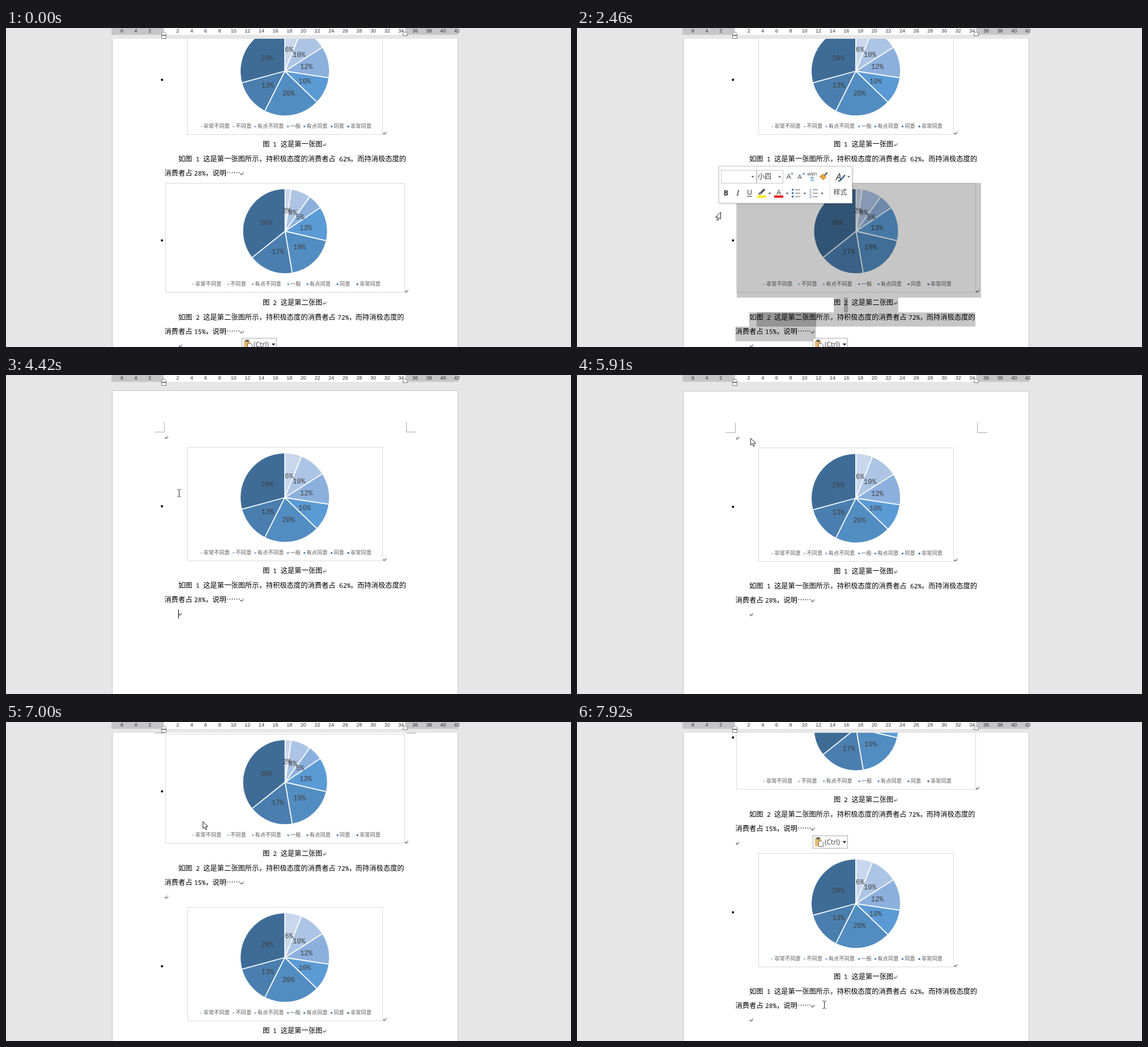
Recreate the animation shown at these times as an HTML page with a canvas. Size 997 by 562 pixels, loop 8000 ms.

```html
<!DOCTYPE html>
<html lang="zh-CN">
<head>
<meta charset="utf-8">
<style>
html, body { margin: 0; width: 100%; height: 100%; overflow: hidden; background: #e6e6e6; }
canvas { display: block; width: 997px; height: 562px; }
</style>
</head>
<body>
<canvas id="stage" width="997" height="562"></canvas>
<script>
const ctx = document.getElementById('stage').getContext('2d');
const LOOP = 8000, STEP = 78, PHASE = 36;
const CJK = '"Noto Sans CJK SC", "Noto Sans CJK JP", "Noto Sans CJK", sans-serif';
const MONO = '"Noto Sans Mono", monospace';
const TYPEWRITER = '"Liberation Mono", monospace';
const SANS = '"Liberation Sans", sans-serif';
const UI = '"Open Sans", sans-serif';
const BLUES = ['#c8d7ed', '#adc5e5', '#8cb0dd', '#5b9bd5', '#528dc1', '#4a7eaf', '#3f6c96'];
const ANSWERS = ['非常不同意', '不同意', '有点不同意', '一般', '有点同意', '同意', '非常同意'];

const charts = [
  { box: [320.5, -12.5, 344, 200], cx: 492, cy: 76, r: 78, bullet: 91, legendY: 173,
    ends: [6.1, 16, 27.4, 37.2, 57.4, 70.8, 100],
    labels: [['6%', 499.5, 38], ['10%', 517, 47], ['12%', 530, 68], ['10%', 527, 94],
      ['20%', 498.5, 115], ['13%', 461.5, 101], ['29%', 461, 53]],
    legend: [343, 400, 438.5, 496, 525, 573, 602.5] },
  { box: [281.5, 273.5, 422, 192], cx: 492.5, cy: 358, r: 74, bullet: 374, legendY: 451,
    ends: [2.3, 9.9, 15.6, 28.6, 47.3, 64.3, 100],
    labels: [['2%', 495.5, 322], ['8%', 506, 324.5], ['5%', 519, 333], ['13%', 529, 352],
      ['19%', 518, 386], ['17%', 479.5, 394], ['36%', 459, 342.5]],
    legend: [328.5, 390.5, 434, 496.5, 530.5, 583.5, 618.5] }
];

const scrollKeys = [[3860, 0], [4260, 120], [4338, 134], [4404, 140], [4482, 141],
  [6580, 141], [6978, 59], [7368, -44], [7446, -40], [7524, -36]];
const pointerKeys = [[210, 738, 560], [740, 440, 534], [920, 437, 535], [1140, 428.5, 535],
  [1440, 425, 535], [1600, 380, 516], [1750, 330, 488], [2060, 256, 338],
  [2450, 256, 338], [2451, 253, 324], [3160, 253, 324], [3470, 268, 300], [3780, 315, 255],
  [4260, 306, 215], [4404, 306, 208], [4900, 290, 112], [5120, 306, 111],
  [6290, 306, 111], [6978, 347, 175], [7390, 400, 380], [7836, 437, 498]];

const within = (t, from, to) => t >= from && t < to;

function track(keys, t) {
  if (t <= keys[0][0]) return keys[0].slice(1);
  for (let i = 1; i < keys.length; i++) {
    const a = keys[i - 1], b = keys[i];
    if (t < b[0]) {
      const k = (t - a[0]) / (b[0] - a[0]);
      return a.slice(1).map((v, n) => v + (b[n + 1] - v) * k);
    }
  }
  return keys[keys.length - 1].slice(1);
}

function rect(x, y, w, h, fill) {
  ctx.fillStyle = fill;
  ctx.fillRect(x, y, w, h);
}

function frame(x, y, w, h, stroke, fill) {
  if (fill) rect(x, y, w, h, fill);
  ctx.strokeStyle = stroke;
  ctx.lineWidth = 1;
  ctx.strokeRect(x, y, w, h);
}

function text(s, x, y, font, color = '#000', align = 'left') {
  ctx.font = font;
  ctx.fillStyle = color;
  ctx.textAlign = align;
  ctx.fillText(s, x, y);
}

function line(points, color, width = 1) {
  ctx.strokeStyle = color;
  ctx.lineWidth = width;
  ctx.beginPath();
  points.forEach(p => ctx.lineTo(...p));
  ctx.stroke();
}

function shape(points, fill, stroke) {
  ctx.beginPath();
  points.forEach(p => ctx.lineTo(...p));
  ctx.closePath();
  if (fill) { ctx.fillStyle = fill; ctx.fill(); }
  if (stroke) { ctx.strokeStyle = stroke; ctx.lineWidth = 1; ctx.stroke(); }
}

// Pieces are [text, x]; plain ASCII gets the monospaced face.
function row(y, pieces) {
  for (const [s, x] of pieces) {
    text(s, x, y + 4.7, /^[\d%]+$/.test(s) ? `11.2px ${MONO}` : `12.3px ${CJK}`);
  }
}

function returnMark(x, y) {
  line([[x + 2.5, y - 3], [x + 2.5, y + 1], [x - 2, y + 1]], '#777');
  shape([[x - 3, y + 1], [x, y - 1.5], [x, y + 3.5]], '#777');
}

function chart(c) {
  frame(...c.box, '#d9d9d9', '#fff');
  rect(273.5, c.bullet - 1.5, 3.5, 3.5, '#000');
  const angle = p => p / 50 * Math.PI - Math.PI / 2;
  c.ends.forEach((end, i) => {
    ctx.beginPath();
    ctx.moveTo(c.cx, c.cy);
    ctx.arc(c.cx, c.cy, c.r, angle(i ? c.ends[i - 1] : 0), angle(end));
    ctx.fillStyle = BLUES[i];
    ctx.fill();
  });
  c.ends.forEach(end => line([[c.cx, c.cy],
    [c.cx + c.r * Math.cos(angle(end)), c.cy + c.r * Math.sin(angle(end))]], '#fff', 1.8));
  c.labels.forEach(([s, x, y]) => text(s, x, y + 4.3, `12.3px ${TYPEWRITER}`, '#404040', 'center'));
  c.legend.forEach((x, i) => {
    rect(x, c.legendY - 1, 3, 3, BLUES[i]);
    text(ANSWERS[i], x + 5.3, c.legendY + 3.4, `9.3px ${CJK}`, '#595959');
  });
}

function shifted(dy, draw) {
  ctx.save();
  ctx.translate(0, dy);
  draw();
  ctx.restore();
}

function firstSection() {
  chart(charts[0]);
  returnMark(668, 185);
  row(204.5, [['图', 453], ['1', 471], ['这是第一张图', 484.5]]);
  returnMark(562, 205.5);
  row(230, [['如图', 304], ['1', 335], ['这是第一张图所示，持积极态度的消费者占', 348],
    ['62%', 588], ['，', 607.5], ['而持消极态度的', 620]]);
  row(255.5, [['消费者占', 279.5], ['28%', 332], ['，说明……', 352]]);
  returnMark(416, 256.5);
  returnMark(307.5, 281);
}

function secondSection() {
  chart(charts[1]);
  returnMark(706.5, 463.5);
  row(483.5, [['图', 453], ['2', 471], ['这是第二张图', 484.5]]);
  returnMark(562, 484.5);
  row(509, [['如图', 304], ['2', 335], ['这是第二张图所示，持积极态度的消费者占', 348],
    ['72%', 585], ['，', 605], ['而持消极态度的', 616.5]]);
  row(534.5, [['消费者占', 279.5], ['15%', 332], ['，说明……', 352]]);
  returnMark(416, 535.5);
}

function selection(x, y) {
  const shade = 'rgba(0,0,0,.224)', field = 'rgba(0,0,0,.25)';
  if (y >= 526) return rect(x, 526, 421 - x, 26, shade);
  rect(279.5, 526, 142, 26, shade);
  if (y >= 500) {
    const left = Math.max(304, x);
    return rect(left, 501, 703 - left, 25, shade);
  }
  rect(304, 501, 399, 25, shade);
  rect(317, 501, 105, 25, field);
  rect(453, 475, 114, 26, shade);
  rect(471, 475, 7, 26, field);
  if (y < 475) rect(282, 273, 431, 202, shade);
}

function dropArrow(x, y, r = 2.5, color = '#555') {
  shape([[x - r, y - r / 2], [x + r, y - r / 2], [x, y + r / 2 + .5]], color);
}

function pasteButton(y) {
  frame(416.5, y + .5, 61, 22, '#ababab', '#fff');
  rect(420, y + 5, 11, 14, '#e8b96a');
  rect(422.5, y + 3, 6, 4, '#666');
  shape([[426.5, y + 9.5], [431.5, y + 9.5], [434.5, y + 12.5], [434.5, y + 19.5], [426.5, y + 19.5]],
    '#fff', '#666');
  text('(Ctrl)', 437, y + 15.5, `12px ${UI}`, '#444');
  dropArrow(472, y + 11.5, 3.5, '#333');
}

function brush(x, y, color) {
  line([[x + 6, y - 7], [x + 1, y - 1]], '#555', 2.5);
  shape([[x - 7, y], [x - 1, y - 4], [x + 4, y + 1], [x - 1, y + 6]], color, '#a66b20');
}

function miniToolbar() {
  ctx.save();
  ctx.shadowColor = 'rgba(0,0,0,.3)';
  ctx.shadowBlur = 4;
  ctx.shadowOffsetY = 1;
  rect(251, 244, 235, 64, '#fff');
  ctx.restore();
  frame(250.5, 243.5, 235, 65, '#c6c6c6');
  frame(254.5, 250.5, 62, 23, '#c6c6c6');
  frame(317.5, 250.5, 46, 23, '#c6c6c6');
  line([[446.5, 248], [446.5, 304]], '#e1e1e1');
  text('小四', 319, 265.5, `12px ${CJK}`, '#333');
  [[310, 262], [357.5, 262], [479.5, 262], [340, 291.5], [371, 291.5], [402, 291.5], [432.5, 291.5]]
    .forEach(p => dropArrow(...p));

  text('A', 369.5, 266, `13px ${UI}`, '#444');
  line([[377.5, 258], [379.5, 255.5], [381.5, 258]], '#2b6cb0', 1.2);
  text('A', 389.5, 266, `11.5px ${UI}`, '#444');
  line([[398, 255.5], [400, 258], [402, 255.5]], '#2b6cb0', 1.2);
  text('wén', 415, 260, `9px ${UI}`, '#444', 'center');
  text('文', 415, 269, `9px ${CJK}`, '#2b7cc4', 'center');
  brush(435.5, 261.5, '#f0a63c');
  text('A', 457, 268, `italic 17px ${UI}`, '#333');
  line([[473, 259], [465, 268], [461, 270]], '#2f5f8f', 2.5);
  text('样式', 452.5, 293.5, `12px ${CJK}`, '#444');

  text('B', 263, 294.5, `bold 12.5px ${UI}`, '#333', 'center');
  text('I', 284, 294.5, 'italic 13px "Noto Serif", serif', '#333', 'center');
  text('U', 304.5, 294, `12.5px ${UI}`, '#333', 'center');
  line([[300, 296.5], [309, 296.5]], '#333');
  line([[331, 284], [324, 291]], '#555', 3.5);
  shape([[321, 289], [326, 293], [320, 294]], '#777');
  rect(318, 295, 15, 4, '#ffe600');
  text('A', 356, 293.5, `13px ${UI}`, '#444', 'center');
  rect(348, 295, 16, 4, '#f01818');
  [285, 291, 297].forEach((y, i) => {
    rect(379, y - 1.5, 3, 3, '#2b6cb0');
    line([[385, y], [394, y]], '#555');
    text(i + 1, 410, y + 2.5, `7px ${SANS}`, '#2b6cb0');
    line([[416, y], [425, y]], '#555');
  });
}

function ruler() {
  rect(0, 0, 997, 19, '#e6e6e6');
  rect(186, 0, 612, 12, '#c6c6c6');
  rect(278.5, 0, 426, 12, '#fff');
  for (let n = -6; n <= 42; n += 2) {
    if (n) text(Math.abs(n), 278.4 + 12.32 * n, 8, `9px ${SANS}`, '#333', 'center');
  }
  shape([[278.5, 6.5], [282.5, 10], [282.5, 12.5], [274.5, 12.5], [274.5, 10]], '#fff', '#777');
  frame(274.5, 13.5, 8, 5, '#777', '#fff');
  shape([[704.5, 6.5], [708.5, 10], [708.5, 13.5], [700.5, 13.5], [700.5, 10]], '#fff', '#777');
}

function iBeam(x, y) {
  x = Math.round(x) - .5;
  y = Math.round(y);
  line([[x, y - 6], [x, y + 6]], '#222');
  [-6.5, 6.5].forEach(d => {
    line([[x - 3, y + d], [x - .8, y + d]], '#222');
    line([[x + .8, y + d], [x + 3, y + d]], '#222');
  });
}

function arrow(x, y, flip) {
  ctx.save();
  ctx.translate(Math.round(x) + .5, Math.round(y) + .5);
  ctx.scale(flip, 1);
  shape([[0, 0], [0, 12], [2.8, 9.6], [4.8, 14.4], [6.8, 13.5], [4.8, 8.8], [8.8, 8.8]], '#fff', '#222');
  ctx.restore();
}

function pointer(t, x, y) {
  if (t < 210 || within(t, 1300, 1450)) return;
  if (within(t, 2460, 3320)) arrow(x, y, -1);
  else if (within(t, 5050, 7300)) arrow(x, y, 1);
  else iBeam(x, y);
}

function page(s, pasted) {
  frame(187.5, s - 112.5, 610, 1200, '#c6c6c6', '#fff');
  line([[279.5, s - 57], [279.5, s - 39.5], [262, s - 39.5]], '#aaa');
  line([[706.5, s - 57], [706.5, s - 39.5], [724, s - 39.5]], '#aaa');
  if (pasted) returnMark(283, s + 249.5);
  else returnMark(283, s - 30);
}

function caret(t, s) {
  if (within(t, 3250, 4900) && !within(t, 3860, 4330)) {
    const fading = within(t, 3700, 3860);
    line([[304.5, s + 273], [304.5, s + 289.5]], fading ? '#999' : '#000');
  }
  if (within(t, 4980, 5200) || within(t, 5590, 5910)) {
    line([[280.5, 103], [280.5, 118]], t < 5680 && t > 5580 ? '#888' : '#000');
  }
}

function draw(t) {
  const snapped = Math.max(0, Math.floor((t - PHASE) / STEP) * STEP + PHASE);
  const s = Math.round(track(scrollKeys, snapped)[0]);
  const [px, py] = track(pointerKeys, snapped);
  const cut = t >= 3170, pasted = t >= 6070;

  rect(0, 0, 997, 562, '#e6e6e6');
  page(s, pasted);
  shifted(pasted ? s + 280 : s, firstSection);
  if (!cut) {
    shifted(0, secondSection);
    returnMark(307.5, 560);
    if (t >= 1450) selection(px, py);
    pasteButton(546);
  }
  if (pasted) {
    shifted(s - 311, secondSection);
    if (within(t, 6140, 6610) || t >= 7840) pasteButton(s + 236);
  }
  caret(t, s);
  ruler();
  if (within(t, 2460, 2850)) miniToolbar();
  pointer(t, px, py);
}

function tick() {
  draw(performance.now() % LOOP);
  requestAnimationFrame(tick);
}
tick();
</script>
</body>
</html>
```
